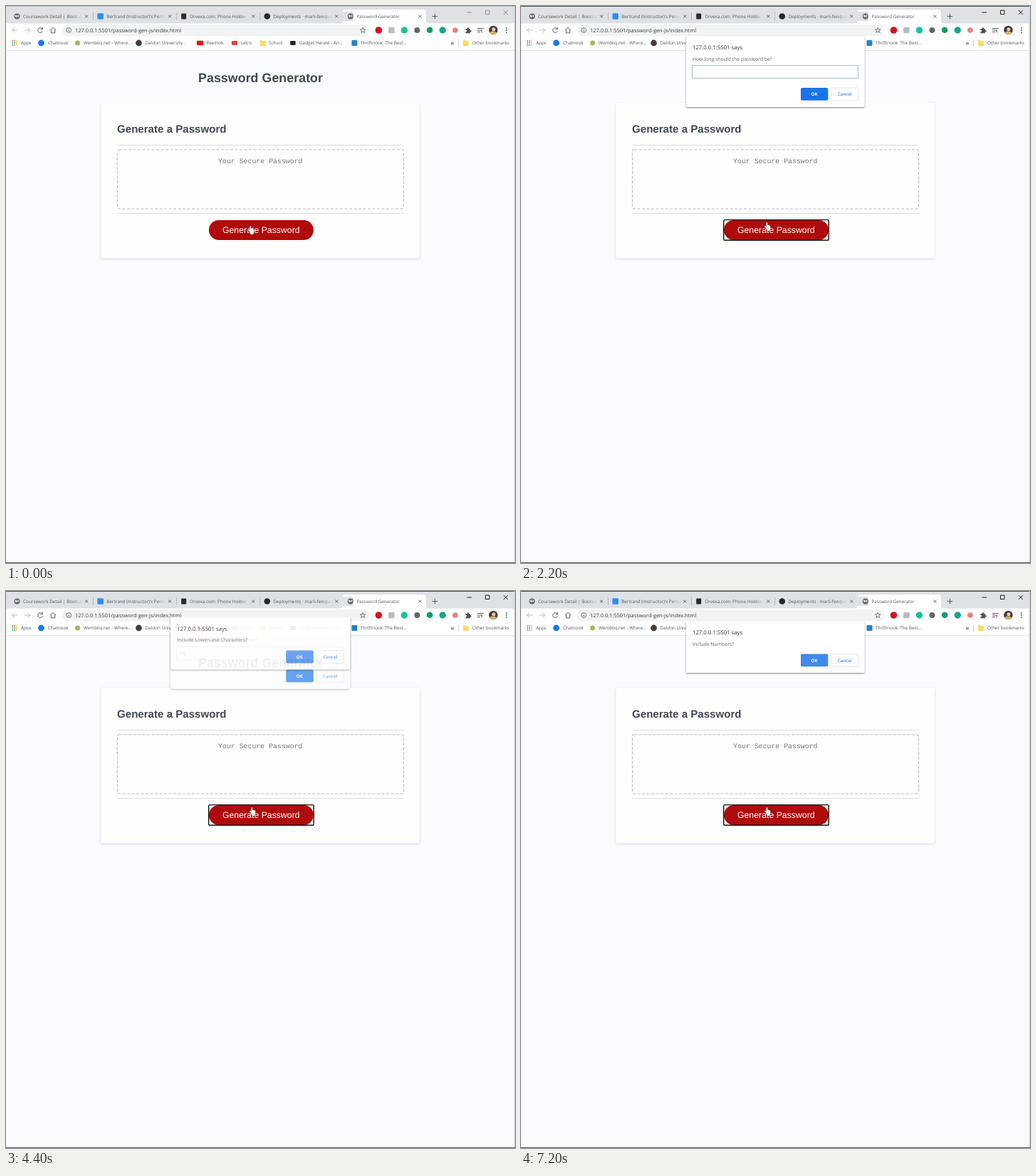
Animation, 715 px wide and 783 px high, one loop 8 s. Source, as an HTML page:

```html
<!DOCTYPE html>
<html lang="en">
<head>
<meta charset="utf-8">
<title>Password Generator</title>
<style>
  html, body { margin: 0; width: 100%; height: 100%; overflow: hidden; background: #f9fbfe; }
  svg { display: block; width: 715px; height: 783px; }
  text { font: 6.35px "Open Sans", "Noto Sans", sans-serif; fill: #505458; white-space: pre; text-rendering: geometricPrecision; }
  .url { font-size: 7.43px; fill: #3a3d41; }
  .heading { font: bold 17.9px "Liberation Sans", Arial, sans-serif; fill: #3e4853; }
  .sub { font: bold 15.1px "Liberation Sans", Arial, sans-serif; fill: #3e4853; }
  .hint { font: 9.9px "Liberation Mono", "DejaVu Sans Mono", monospace; fill: #757575; }
  .action { font: 12.3px "Liberation Sans", Arial, sans-serif; fill: #fff; }
  .says { font-size: 7.75px; fill: #303236; }
  .ask { font-size: 6.9px; fill: #5f6368; }
  .key { font-size: 6.2px; font-weight: 600; text-anchor: middle; }
  .more { font-size: 9px; font-weight: 600; }
  .mid { text-anchor: middle; }
  .line { fill: none; stroke: #55595e; stroke-width: 1; }
  .thin { stroke-width: .8; }
</style>
</head>
<body>
<svg viewBox="0 0 715 783">
  <defs>
    <linearGradient id="fade"><stop offset="0" stop-color="#dee1e6" stop-opacity="0"/><stop offset="1" stop-color="#dee1e6"/></linearGradient>
    <filter id="cardShadow" x="-10%" y="-10%" width="120%" height="120%"><feDropShadow dx="0" dy="1" stdDeviation="1.8" flood-color="#3b4953" flood-opacity=".25"/></filter>
    <filter id="boxShadow" x="-10%" y="-15%" width="120%" height="130%"><feDropShadow dx="0" dy="1" stdDeviation="1.2" flood-color="#000" flood-opacity=".5"/></filter>
    <g id="globe"><circle r="4" fill="#5f6368"/><path d="M-3 -1.6Q-1 -2.6 0 -.8T-1.3 1.5Q-3 1 -3 -1.6M.6 -2.6L2.9 -1 2.2 1.4 .9 .6Z" fill="#dee1e6"/></g>
    <path id="cross" class="line" d="M-2 -2L2 2M2 -2L-2 2"/>
    <path id="folder" d="M0 0h3l1 1.2h4v7h-8z" fill="#fbd96b"/>
  </defs>

  <rect width="715" height="783" fill="#f9fbfe"/>

  <!-- page -->
  <text class="heading mid" x="357.5" y="107">Password Generator</text>
  <rect x="133.500" y="136" width="447.500" height="218.500" rx="2.5" fill="#fefefd" filter="url(#cardShadow)"/>
  <text class="sub" x="156" y="178">Generate a Password</text>
  <path d="M156 195.5H559M156 291.5H559" stroke="#dcdddd"/>
  <rect x="156.5" y="202" width="402" height="83" rx="2.5" fill="none" stroke="#bcbdbd" stroke-width="1.2" stroke-dasharray="4.2 2.3"/>
  <text class="hint mid" x="357.3" y="221">Your Secure Password</text>
  <rect x="285" y="301" width="147" height="28" rx="14" fill="#b00a0a"/>
  <rect id="ring" x="284.700" y="300.600" width="147.600" height="28.600" rx="1.5" fill="none" stroke="#111" stroke-width="1.4"/>
  <text class="action mid" x="358.3" y="318.8">Generate Password</text>

  <!-- browser -->
  <rect width="715" height="25" fill="#dee1e6"/>
  <path d="M468 24.5Q472.5 24.5 472.5 20V9Q472.5 5 476.5 5H586Q590 5 590 9V20Q590 24.5 594.5 24.5H715V62H0V24.5Z" fill="#fff"/>
  <path d="M0 62.5H715" stroke="#e2e4e7"/>
  <g id="tabs"></g>
  <path class="line" d="M598.8 14.5H606.2M602.5 10.8V18.2"/>
  <g id="controls" fill="none"><path d="M647.5 9H654M673.5 6H679V11.5H673.5ZM699 6L705 12M705 6L699 12"/></g>

  <g class="line">
    <path d="M16.2 34H8.5M12 30.5L8.5 34 12 37.5M26 34H33.7M30.2 30.5L33.7 34 30.2 37.5" stroke="#b5b8bb"/>
    <path d="M50.8 32A3.4 3.4 0 1 0 51.3 35.2M51.3 30V32.7H48.6M62 34.2L66 30.3 70 34.2M63.4 33.5V37.9H68.6V33.5"/>
  </g>
  <rect x="79" y="26" width="431" height="16.5" rx="8.2" fill="#f1f3f4"/>
  <circle class="line thin" cx="88.2" cy="34" r="3.4"/>
  <path class="line" d="M88.2 33.5V36M88.2 31.8V32.6"/>
  <text class="url" x="97" y="36.7">127.0.0.1:5501/password-gen-js/index.html</text>
  <path id="star" class="line thin"/>
  <g id="extensions"></g>
  <path d="M645.5 32H648A1.2 1.2 0 1 1 650 32H652V34.2A1.2 1.2 0 1 1 652 36.2V38.2H645.5V36A1.2 1.2 0 1 0 645.5 34Z" fill="#4d5156"/>
  <path class="line" d="M662 31.5H669M662 34H669M662 36.5H666M668.3 34V37.5M668.3 31.5H671"/>
  <circle cx="684.5" cy="34" r="6.2" fill="#493a3b"/>
  <path d="M679.3 37.2Q684 33 689.5 37.5A6.2 6.2 0 0 1 679.3 37.2Z" fill="#d9b25f"/>
  <circle cx="685" cy="32.8" r="2.5" fill="#e8cabc"/>
  <g fill="#4d5156"><circle cx="703" cy="31" r=".9"/><circle cx="703" cy="34" r=".9"/><circle cx="703" cy="37" r=".9"/></g>

  <g id="apps"></g>
  <g id="bookmarks"></g>
  <use href="#folder" x="357" y="48"/><use href="#folder" x="642" y="48"/>
  <text class="more" x="624.5" y="54.8">»</text>
  <path d="M635.5 47V57" stroke="#d2d5d8"/>

  <path id="topEdge" d="M0 .5H715"/>
  <path d="M714.5 0V783" stroke="#c9ccd1"/>
  <path d="M0 782.5H715" stroke="#55585c"/>

  <g id="dialogs"></g>

  <g id="hand">
    <path d="M342.3 317.8L340.1 314.9Q339.900 313.300 341.300 313.500L342.300 314.500V309.800Q343.300 308.300 344.400 309.800V312.600Q345.200 312 345.900 312.800Q346.700 312.400 347.300 313.200Q348.600 313 348.600 314.500V317.500L347.500 321.200H343.500Z" fill="#fff" stroke="#333" stroke-width=".5"/>
    <path d="M344.6 316.500V318.700M346.200 316.500V318.700" stroke="#777" stroke-width=".35"/>
  </g>
</svg>

<script>
const $ = id => document.getElementById(id);
const LOOP = 8000, STEP = 200;

const label = (x, y, s, cls = "") => `<text x="${x}" y="${y}" class="${cls}">${s}</text>`;
const dot = (x, y, r, c) => `<circle cx="${x}" cy="${y}" r="${r}" fill="${c}"/>`;
const tile = (x, y, w, h, c) =>
  `<rect x="${x - w / 2}" y="${y - h / 2}" width="${w}" height="${h}" rx="1.2" fill="${c}"/>`;

// Tabs
const globe = x => `<use href="#globe" x="${x}" y="14.5"/>`;
const tabs = [
  ["Coursework Detail | Bootcamp", globe],
  ["Bertrand (Instructor)'s Personal", x => tile(x, 14.5, 8.5, 8.5, "#2d8cff")],
  ["Orvexa.com: Phone Holder", x => tile(x, 14.5, 7, 8, "#2a2a2a")],
  ["Deployments · marli-fen/pass", x => dot(x, 14.5, 4.3, "#24292e")],
  ["Password Generator", globe]
];
$("tabs").innerHTML = tabs.map(([name, icon], i) => {
  const x = 15.5 + i * 117.1, active = i === 4;
  const veil = active ? "" :
    `<rect x="${x + 79}" y="8" width="12.1" height="13" fill="url(#fade)"/>
     <rect x="${x + 91}" y="8" width="30" height="13" fill="#dee1e6"/>`;
  const gap = i < 3 ? `<path d="M${x + 107} 9V20" stroke="#a5a8ad" stroke-width=".8"/>` : "";
  return label(x + 8.6, 16.8, name) + veil + gap + icon(x) +
    `<use href="#cross" x="${x + 97.6}" y="14.5"/>`;
}).join("");

// Toolbar and bookmarks
$("star").setAttribute("d", "M" + Array.from({ length: 10 }, (_, i) => {
  const r = i % 2 ? 1.7 : 4, a = i * Math.PI / 5;
  return `${501.2 + r * Math.sin(a)} ${34.2 - r * Math.cos(a)}`;
}).join("L") + "Z");

$("extensions").innerHTML =
  dot(523.5, 34, 4.8, "#d5121f") + tile(541.5, 34, 8.5, 8.5, "#b9bdbf") +
  dot(559.5, 34, 4.7, "#15c39a") + dot(577.5, 34, 4, "#62666b") +
  dot(595.2, 33.8, 4.3, "#0b9d68") + dot(613.3, 34, 4.7, "#14a68c") +
  dot(631, 34, 3.8, "#ee8073");

const hues = ["#e24a3b", "#e24a3b", "#f0b32e", "#35a35a", "#4285f4", "#f0b32e", "#35a35a", "#35a35a", "#f0b32e"];
$("apps").innerHTML = hues.map((c, i) =>
  tile(9.2 + i % 3 * 2.8, 49.2 + Math.floor(i / 3) * 2.8, 1.9, 1.9, c)).join("");

const marks = [
  [21, "Apps"],
  [59, "Chatnook", dot(49.5, 52, 4.4, "#1877f2")],
  [109, "Wembliq.net - Where...", dot(100.5, 52, 3.5, "#a8b35c")],
  [195.5, "Daldon University...", dot(186.5, 52, 4.4, "#493b3c")],
  [281.5, "Reelnob", tile(272.5, 52, 9, 6.5, "#f20d0d")],
  [330, "Letro", tile(321, 52, 8, 6.2, "#d94a3d")],
  [369, "School"],
  [412, "Gadget Herald - An...", tile(403, 52, 7.5, 6, "#252525")],
  [498, "Thriftnook: The Best...", tile(489.5, 52, 8, 8, "#2583c4")],
  [655, "Other bookmarks"]
];
$("bookmarks").innerHTML = marks.map(([x, s, icon = ""]) => icon + label(x, 54.3, s)).join("");

// Dialogs
function dialog(id, question, prompt) {
  const h = prompt ? 100 : 73, by = prompt ? 115 : 88.5;
  const field = prompt ?
    `<rect x="240.5" y="83.5" width="233" height="18" fill="#fff" stroke="#a3bccb"/>
     <text id="typed" class="ask" x="245" y="95.2"></text>
     <path id="caret" d="M246 88V97.5" stroke="#333" stroke-width=".8"/>` : "";
  return `<g id="${id}"><rect x="232" y="42" width="250.5" height="${h}" rx="1.5" fill="#fff" filter="url(#boxShadow)"/>` +
    label(241, 61, "127.0.0.1:5501 says", "says") + label(241, 76.5, question, "ask") + field +
    `<rect x="393" y="${by}" width="38.3" height="17.8" rx="1.8" fill="${prompt ? "#1a73e8" : "#4089ee"}"/>
     <rect x="436" y="${by}" width="37.8" height="17.8" rx="1.8" fill="#fff" stroke="#dfe2e6" stroke-width=".9"/>
     <text class="key" x="412" y="${by + 11.2}" style="fill:#fff;font-weight:700">OK</text>
     <text class="key" x="454.8" y="${by + 11.2}" style="fill:#4385d6">Cancel</text></g>`;
}

// id, question, opening time, closing time
const asks = [
  ["length", "How long should the password be?", 800, 4400],
  ["lower", "Include Lowercase Characters?", 4400, 6200],
  ["upper", "Include Uppercase Characters?", 6200, 6800],
  ["digits", "Include Numbers?", 6800, LOOP]
];
$("dialogs").innerHTML = asks.map(([id, q], i) => dialog(id, q, i === 0)).join("");

const at = (table, t) => table.filter(row => row[0] <= t).pop();
const handPath = [[0, 0, 0], [200, 1, -1], [600, 2, -3], [1600, 2, -4], [1800, 2, -5]];
const typing = [[0, ""], [3800, "1"], [4000, "14"]];
const blink = [[0, 0], [1600, 1], [2200, 0], [2600, 1], [3200, 0], [3600, 1], [4400, 0]];

function draw(now) {
  const t = Math.floor(now % LOOP / STEP) * STEP;
  const focused = t >= 600;
  $("ring").setAttribute("visibility", focused ? "visible" : "hidden");
  $("controls").setAttribute("stroke", focused ? "#222" : "#8f9398");
  $("topEdge").setAttribute("stroke", focused ? "#4b4e52" : "#b5b8bc");

  for (const [id, , open, close] of asks) {
    const opening = t === open, closing = t === close;
    const alpha = opening ? .77 : closing ? .65 : t > open && t < close ? 1 : 0;
    const node = $(id);
    node.setAttribute("opacity", alpha);
    node.setAttribute("transform", opening || closing ?
      "translate(357.25 36.7) scale(1.008) translate(-357.25 -42)" : "");
  }

  const text = at(typing, t)[1];
  $("typed").textContent = text;
  $("caret").setAttribute("opacity", at(blink, t)[1]);
  $("caret").setAttribute("transform", `translate(${text.length * 4} 0)`);
  const [, x, y] = at(handPath, t);
  $("hand").setAttribute("transform", `translate(${x} ${y})`);
}

const start = performance.now();
function tick() {
  draw(performance.now() - start);
  requestAnimationFrame(tick);
}
tick();
</script>
</body>
</html>
```
